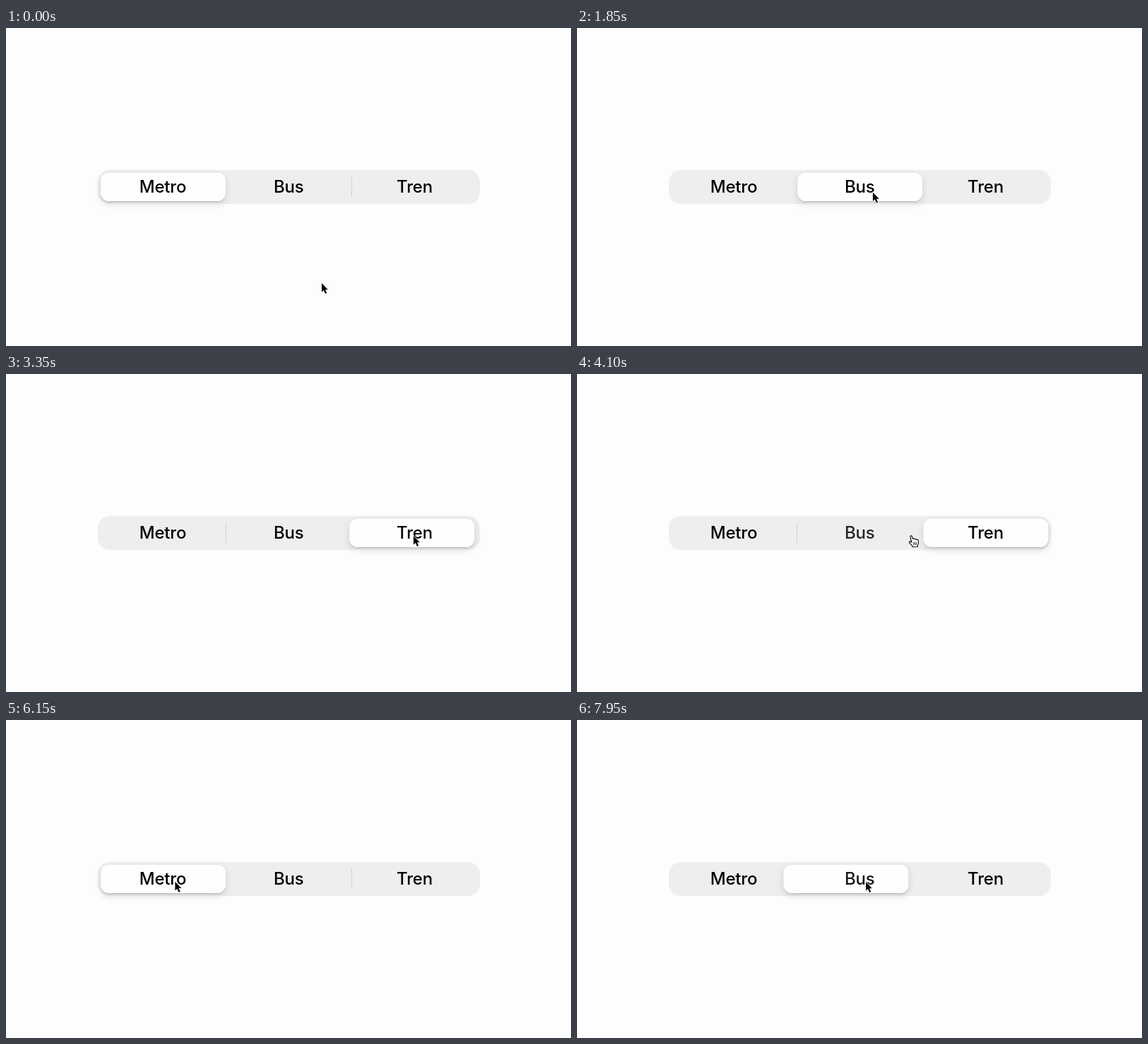
Recreate the animation shown at these times as an HTML page. Size 800 by 450 pixels, loop 8 s.

```html
<!DOCTYPE html>
<html lang="es">
<head>
<meta charset="utf-8">
<title>Segmented control</title>
<style>
  html, body { margin: 0; width: 100%; height: 100%; overflow: hidden; background: #fdfcfe; }
  #stage { position: relative; width: 800px; height: 450px; overflow: hidden; }
  #stage > * { position: absolute; }
  #track { left: 130px; top: 200.5px; width: 541px; height: 48px; border-radius: 17px; background: #eeedef; }
  #thumb {
    left: 134px; top: 205px; width: 177px; height: 39.5px; border-radius: 11.5px; background: #fefefe;
    box-shadow: 0 1.5px 1px rgba(0, 0, 0, .11), 0 4px 11px rgba(0, 0, 0, .12);
  }
  .sep { top: 210px; width: 1.5px; height: 29px; background: #d0cfd3; }
  .label {
    top: 205px; width: 178px; height: 40px; line-height: 40px; text-align: center; color: #000;
    font: 500 24px/40px Inter, "Open Sans", sans-serif; letter-spacing: -.2px;
  }
  #cursor { left: 0; top: 0; overflow: visible; }
</style>
</head>
<body>
<div id="stage">
  <div id="track"></div>
  <div class="sep" style="left:310.5px"></div>
  <div class="sep" style="left:488.7px"></div>
  <div id="thumb"></div>
  <div class="label" style="left:133px">Metro</div>
  <div class="label" style="left:311.3px">Bus</div>
  <div class="label" style="left:489.5px">Tren</div>
  <svg id="cursor" width="20" height="20" stroke-linejoin="round" stroke-linecap="round">
    <path id="arrow" d="M0 0V12.6L2.9 10L5.1 15L7.2 14.1L5.1 9.3H8.9Z"
          stroke="#fff" stroke-width="1.6" paint-order="stroke"/>
    <g id="hand" stroke="#000" stroke-width="1.1">
      <path fill="#fff" d="M-1.3 1C-.9 -.5 .8 -.4 1.2 .9L2.4 4.5C3 3.5 4.7 3.6 5.1 4.9C6 4.1 7.3 4.4 7.7 5.6
        C8.8 5 9.9 5.7 10.2 6.9C10.7 9 10.5 11 9.4 13.3L9.2 15.6L2.4 15.8C1.8 14 -.2 12.4 -2 10.4
        C-3.4 9 -2.6 7.5 -1.1 8L.7 9.3Z"/>
      <path fill="none" stroke-width=".8" d="M3.3 9.3L3.7 12.6M5.3 9.2L5.6 12.6M7.3 9.1L7.4 12.5"/>
    </g>
  </svg>
</div>
<script>
const LOOP = 8000, FADE = 200, DIM = .2, PITCH = 178.2;
const $ = id => document.getElementById(id);
const labels = [...document.querySelectorAll('.label')];
const seps = [...document.querySelectorAll('.sep')];

// Each track: start value, then [time, new value] transitions.
const selected = [0, [1340, 1], [3190, 2], [5390, 0], [7830, 1]];
const sepTracks = [
  [0, [3190, 1], [5390, 0]],
  [1, [1340, 0], [5390, 1], [7830, 0]],
];
const opacity = [
  [1, [4378, DIM], [5390, 1]],
  [1, [508, DIM], [1340, 1], [4070, DIM], [4378, 1], [6671, DIM], [7830, 1]],
  [1, [2150, DIM], [3190, 1]],
];
const presses = [[2, 3150, 3190], [0, 5300, 5390], [1, 7800, 7830]];

// Cursor moves: start, end, x0, y0, x1, y1, easing.
const sine = p => (1 - Math.cos(Math.PI * p)) / 2;
const linear = p => p;
const moves = [
  [30, 680, 447, 361, 417, 232.5, sine],
  [1800, 2540, 417, 232.5, 577, 229, sine],
  [3775, 4650, 577, 229, 236.5, 228.7, sine],
  [6130, 6900, 236.5, 228.7, 344, 229.5, linear],
  [6900, 7300, 344, 229.5, 409, 229, linear],
];

const clamp = p => Math.min(1, Math.max(0, p));
const mix = (a, b, p) => a + (b - a) * p;
const bezier = (a, b, u) => 3 * a * u * (1 - u) ** 2 + 3 * b * u * u * (1 - u) + u ** 3;

// Same curve as the CSS "ease" keyword.
function ease(p) {
  if (p <= 0 || p >= 1) return clamp(p);
  let lo = 0, hi = 1;
  for (let i = 0; i < 20; i++) {
    const mid = (lo + hi) / 2;
    if (bezier(.25, .25, mid) < p) lo = mid; else hi = mid;
  }
  return bezier(.1, 1, lo);
}

const valueAt = ([start, ...steps], t) =>
  steps.reduce((v, [at, to]) => mix(v, to, ease((t - at) / FADE)), start);

const targetAt = ([start, ...steps], t) =>
  steps.reduce((v, [at, to]) => t >= at ? to : v, start);

function cursorAt(t) {
  const [t0, t1, x0, y0, x1, y1, curve] = moves.filter(m => t >= m[0]).pop() || moves[0];
  const p = curve(clamp((t - t0) / (t1 - t0)));
  return [mix(x0, x1, p), mix(y0, y1, p)];
}

function scaleAt(i, t) {
  const press = presses.find(([label, down]) => label === i && t >= down);
  return press ? mix(.965, 1, ease((t - press[2]) / FADE)) : 1;
}

function draw(t) {
  $('thumb').style.transform = `translateX(${valueAt(selected, t) * PITCH}px)`;
  seps.forEach((el, i) => el.style.opacity = valueAt(sepTracks[i], t));
  labels.forEach((el, i) => {
    el.style.opacity = valueAt(opacity[i], t);
    el.style.transform = `scale(${scaleAt(i, t)})`;
  });
  const [x, y] = cursorAt(t);
  const hovering = opacity.some(track => targetAt(track, t) === DIM);
  $('cursor').style.transform = `translate(${x}px, ${y}px)`;
  $('hand').style.display = hovering ? '' : 'none';
  $('arrow').style.display = hovering ? 'none' : '';
}

const begin = performance.now();
function tick() {
  draw((performance.now() - begin) % LOOP);
  requestAnimationFrame(tick);
}
tick();
</script>
</body>
</html>
```
